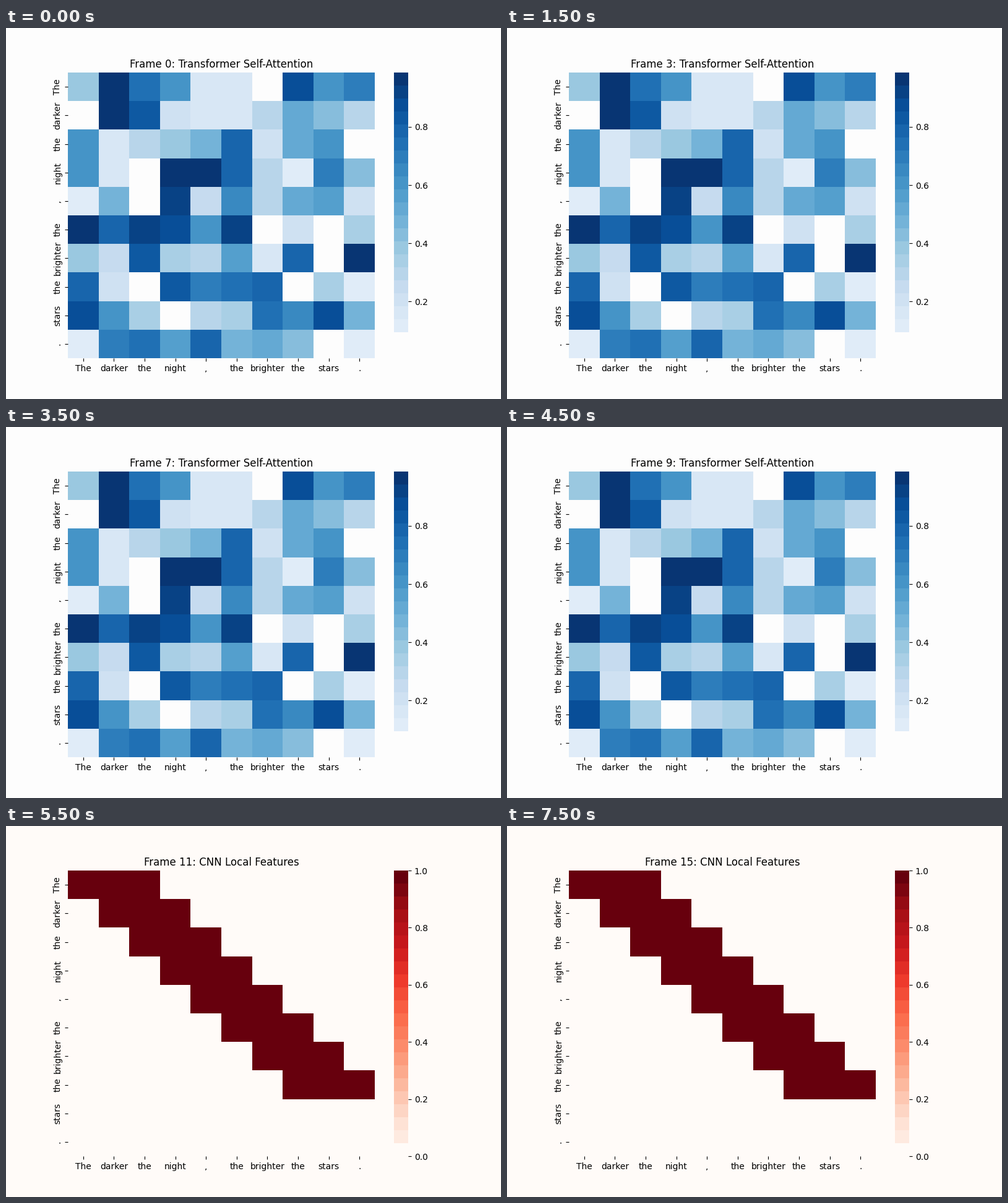
Write a matplotlib script that moves like this. It is 800 by 600 pixels and loops after 8 s.

```python
import numpy as np
import matplotlib.pyplot as plt
from matplotlib.animation import FuncAnimation
from matplotlib.colors import ListedColormap

plt.rcParams["font.family"] = "DejaVu Sans"

TOKENS = "The darker the night , the brighter the stars .".split()
N = len(TOKENS)
FRAMES, SWITCH, INTERVAL = 16, 10, 500
LEVELS = 22
PAPER, WARM = "#fdfdfd", "#fffbf8"


def banded(name, paper, blank, top):
    """Posterise a colormap; the lowest `blank` bands take the paper colour."""
    shades = plt.get_cmap(name)(np.linspace(0.5 / LEVELS, top, LEVELS))
    return ListedColormap([paper] * blank + list(shades[blank:]))


def heatmap(fig, data, cmap):
    """Draw a labelled heatmap with its colour bar; return both axes."""
    ax = fig.add_subplot(111)
    ax.set_facecolor("none")
    mesh = ax.pcolormesh(data, cmap=cmap)
    ax.set(xlim=(0, N), ylim=(N, 0))
    ax.spines[:].set_visible(False)
    centers = np.arange(N) + 0.5
    ax.set_xticks(centers, TOKENS)
    ax.set_yticks(centers, TOKENS, rotation="vertical", va="center")
    bar = fig.colorbar(mesh, ax=ax)
    bar.outline.set_linewidth(0)
    return ax, bar.ax


attention = np.random.RandomState(42).rand(N, N)
conv = np.zeros((N, N))
for i in range(N - 2):
    conv[i, i:i + 3] = 1

fig = plt.figure(figsize=(8, 6), dpi=100)
blues = banded("Blues", PAPER, blank=2, top=1 - 0.5 / LEVELS)
reds = banded("Reds", WARM, blank=1, top=1)
scenes = [
    (heatmap(fig, attention, blues), "Transformer Self-Attention", PAPER),
    (heatmap(fig, conv, reds), "CNN Local Features", WARM),
]


def update(frame):
    active = int(frame >= SWITCH)
    for i, (axes, label, paper) in enumerate(scenes):
        for ax in axes:
            ax.set_visible(i == active)
        if i == active:
            axes[0].set_title(f"Frame {frame}: {label}")
            fig.set_facecolor(paper)
    return []


anim = FuncAnimation(fig, update, frames=FRAMES, interval=INTERVAL,
                     repeat=True, repeat_delay=0, blit=False)
plt.show()
```
